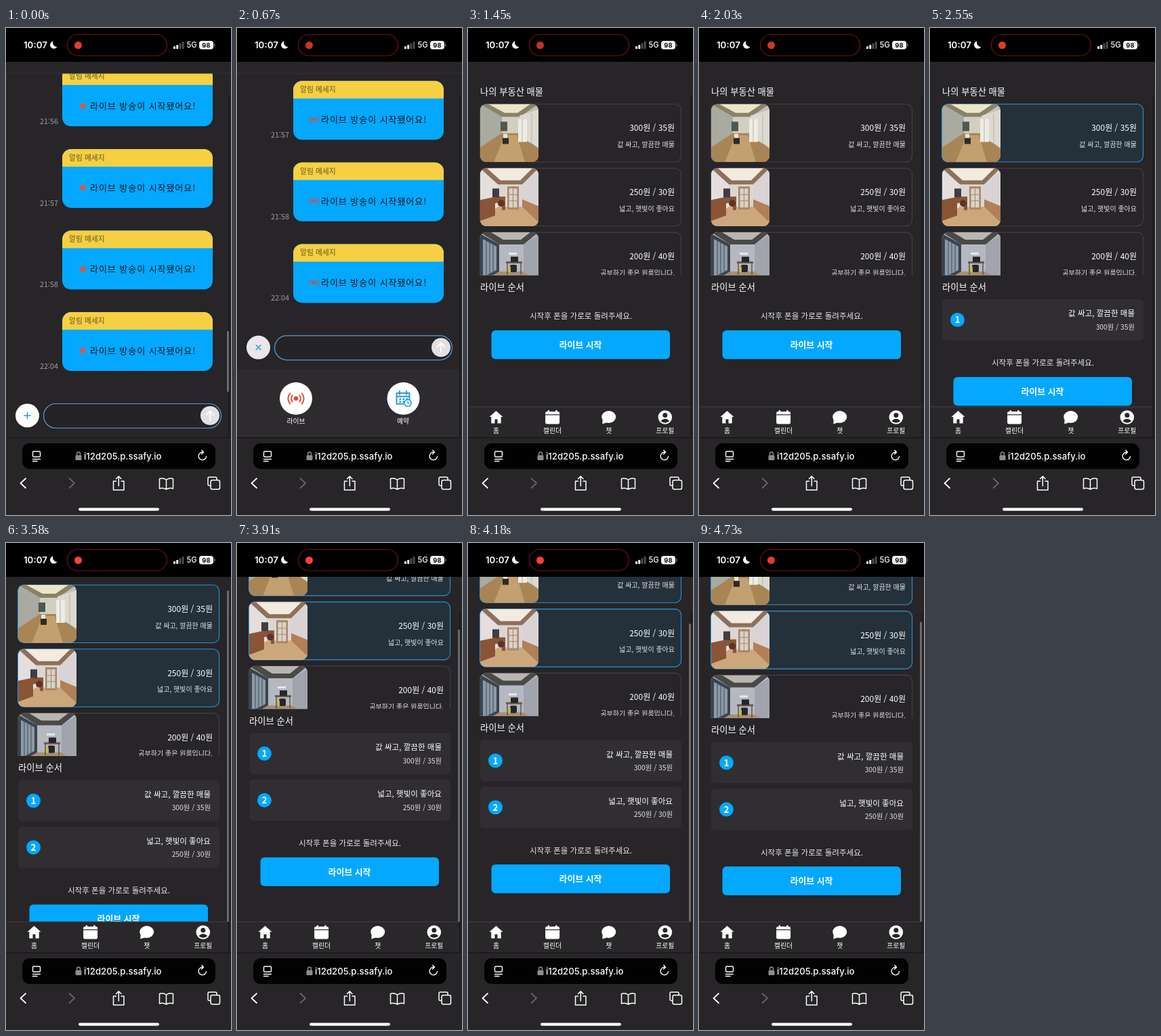
Recreate the animation shown at these times as an HTML page. Size 332 px wide and 720 px high, loop 4760 ms.

```html
<!DOCTYPE html>
<html lang="ko">
<head>
<meta charset="utf-8">
<style>
html, body { margin: 0; width: 100%; height: 100%; overflow: hidden; background: #000; }
svg { display: block; width: 332px; height: 720px; }
text { font-family: "Noto Sans CJK KR", "Noto Sans CJK", sans-serif; white-space: pre; }
.ui { font-family: Inter, sans-serif; }
.chat { letter-spacing: .95px; }
.line { fill: none; stroke-linecap: round; stroke-linejoin: round; }
</style>
</head>
<body>
<svg id="stage" viewBox="0 0 332 720"></svg>
<script>
const LOOP = 4760, BG = '#272528', BLUE = '#04a8ff', RED = '#e8452f';
const stage = document.getElementById('stage');

// Shape helpers; text is placed by its vertical middle.
const rect = (x, y, w, h, fill, r = 0, more = '') =>
  `<rect x="${x}" y="${y}" width="${w}" height="${h}" rx="${r}" fill="${fill}" ${more}/>`;
const circle = (x, y, r, fill, more = '') => `<circle cx="${x}" cy="${y}" r="${r}" fill="${fill}" ${more}/>`;
const line = (d, color, w = 1.6, more = '') => `<path class="line" d="${d}" stroke="${color}" stroke-width="${w}" ${more}/>`;
const shape = (d, fill) => `<path d="${d}" fill="${fill}"/>`;
const text = (x, y, size, str, { w = 400, fill = '#fff', at = 'start', cls = '' } = {}) =>
  `<text class="${cls}" x="${x}" y="${y + size * .37}" font-size="${size}" font-weight="${w}" fill="${fill}" text-anchor="${at}">${str}</text>`;
const group = (x, y, body, more = '') => `<g transform="translate(${x} ${y})" ${more}>${body}</g>`;
const clip = (id, x, y, w, h, r = 0) => `<clipPath id="${id}">${rect(x, y, w, h, '#000', r)}</clipPath>`;

const waves = (s, w) => [-1, 1].map(k =>
  line(`M${k * 4.3 * s} ${-4 * s}q${k * 3 * s} ${4 * s} 0 ${8 * s}M${k * 7.2 * s} ${-6.5 * s}q${k * 5 * s} ${6.5 * s} 0 ${13 * s}`, RED, w)).join('');

function bubble(y, time) {
  return group(0, y,
    text(77, 80, 10.8, time, { fill: '#a09ea1', at: 'end' }) +
    rect(83, 0, 222, 87, BLUE, 13) +
    shape('M83 26V13a13 13 0 0 1 13-13H292a13 13 0 0 1 13 13V26z', '#f6d042') +
    text(93, 13, 10.8, '알림 메세지', { fill: '#63562a' }) +
    circle(113.5, 57, 4, '#ee5135', 'class="dot"') +
    group(113.5, 57, circle(0, 0, 2.2, RED) + waves(.72, 1), 'class="rings"') +
    text(124, 57, 13, '라이브 방송이 시작됐어요!', { fill: '#08131c', cls: 'chat' }));
}

const rooms = [
  rect(0, 0, 86, 86, '#c3c0b4') +
  shape('M0 0H86L58 19H32z', '#8a8268') + shape('M12 0H74L55 13H36z', '#ece5c8') +
  shape('M0 0L32 19V44L0 66z', '#a9aaa0') + rect(32, 19, 26, 26, '#d2cfc2') +
  shape('M0 64L32 43H58L86 66V86H0z', '#a98455') + shape('M20 86L36 46H54L66 86z', '#c3a070') +
  shape('M58 17L86 8V64L58 48z', '#dcdad0') + rect(56, 22, 13, 34, '#eeece4') +
  line('M62 22V56M76 14V58', '#b5b3a9', 1) +
  rect(30, 26, 10, 14, '#4f5752') + rect(33, 50, 9, 9, '#2e2a26') + rect(34, 44, 6, 6, '#e5e3d9'),
  rect(0, 0, 86, 86, '#dcd6d3') +
  shape('M0 0H86L62 24H26z', '#8d705c') + shape('M10 0H77L59 18H30z', '#f3eae0') +
  shape('M0 2L26 24V58L0 70z', '#e4dedd') + shape('M62 24L86 4V78L62 58z', '#d9d3d5') +
  shape('M62 46L86 56V82L62 60z', '#b17f58') + shape('M0 76L26 57H62L86 80V86H0z', '#cda77c') +
  rect(40, 27, 17, 34, '#a7866b') + rect(42.5, 30, 12, 28, '#d9d2c6') +
  line('M48.5 30V58M43 39H54M43 48H54', '#a7866b', 1) +
  shape('M0 47L24 42H37V62H32V50L22 52V70L0 78z', '#8a5537') + rect(18, 30, 10, 13, '#423c43') +
  circle(31, 52, 5, '#5a3428'),
  rect(0, 0, 86, 86, '#b5b8c0') +
  shape('M0 0H86L64 18H28z', '#4b4948') + shape('M16 0H74L60 11H34z', '#b9b5b0') +
  shape('M0 2L28 18V60L0 74z', '#3b444e') + shape('M4 10L24 21V56L4 66z', '#8c9aa8') +
  line('M9 12V64M14 15V62M19 18V59', '#4d5966', 1.2) +
  shape('M64 18L86 4V76L64 58z', '#a1a4ac') + shape('M0 74L28 58H64L86 74V86H0z', '#a88f72') +
  rect(42, 30, 12, 3, '#e9eaee') + rect(38, 43, 24, 3, '#6f5844') + rect(45, 36, 11, 8, '#23262b') +
  rect(44, 48, 10, 11, '#26262a', 2) + rect(41, 51, 4, 8, '#c6b93c') + line('M60 46V62M40 46V62', '#45403c', 1.2)
];
const homes = [['300원 / 35원', '값 싸고, 깔끔한 매물'], ['250원 / 30원', '넓고, 햇빛이 좋아요'], ['200원 / 40원', '공부하기 좋은 원룸입니다.']];

const card = ([price, note], i) => group(17, 112 + 94.8 * i,
  rect(.5, .5, 297, 85.5, 'none', 9, 'class="card" stroke-width="1.1"') +
  `<g transform="translate(1 .5)" clip-path="url(#photo)">${rooms[i]}</g>` +
  text(288, 36, 12, price, { w: 500, at: 'end' }) + text(288, 60.5, 10, note, { fill: '#e4e3e5', at: 'end' }));

const order = ([price, note], i) => group(18, 401 + 69 * i,
  rect(0, 0, 297, 61, '#302e31', 6) + circle(22.5, 30.5, 10.5, BLUE) +
  text(22.5, 30.5, 13.5, i + 1, { w: 700, at: 'middle' }) +
  text(284, 21, 11.55, note, { w: 500, at: 'end' }) + text(284, 41, 10.3, price, { fill: '#e4e3e5', at: 'end' }),
  'class="order"');

const chatPage =
  `<g clip-path="url(#messages)"><g id="thread">` +
  ['21:56', '21:57', '21:58', '22:04'].map((time, i) => bubble(58.3 + 120.6 * i, time)).join('') + '</g></g>' +
  rect(0, 66.5, 332, 1, '#39373a') +
  `<g id="bar">` +
  rect(0, 606, 332, 102, '#2d2b2e') +
  circle(31.5, 573, 17.5, '#fff', 'id="plus"') +
  `<g id="cross">${line('M-4.6 0H4.6M0-4.6V4.6', '#1d9fe3', 1.6)}</g>` +
  rect(55.5, 555.5, 262, 36, '#252326', 18, 'stroke="#5b9bd8" stroke-width="1.2"') +
  circle(301, 573, 14, '#e2e0e3') + line('M301 580V566.5M295.5 572L301 566.5L306.500 572', '#fff', 1.8) +
  group(87, 648.5, circle(0, 0, 24, '#fff') + circle(0, 0, 3.2, RED) + waves(1.2, 1.8)) +
  group(245.5, 648.5, circle(0, 0, 24, '#fff') +
    line('M-10-8H9V3M-10-8V8H0M-10-3H9M-5.500-11V-6M4.500-11V-6', '#2596d6', 1.9) +
    [-6, -1, 4].map(x => rect(x, -.5, 2.6, 2.6, '#2596d6') + (x < 4 ? rect(x, 3.5, 2.6, 2.6, '#2596d6') : '')).join('') +
    circle(6.5, 6.5, 5, '#fff', 'stroke="#2596d6" stroke-width="1.6"') + line('M6.500 3.800V6.800H9', '#2596d6', 1.3)) +
  text(87, 681.8, 9.8, '라이브', { at: 'middle' }) + text(245, 681.8, 9.8, '예약', { at: 'middle' }) +
  '</g>';

const navIcons = [
  shape('M0-9.500L10-.5H7.200V9H2V3H-2V9H-7.200V-.5H-10z', '#fff'),
  rect(-10.5, -8.5, 21, 18.5, '#fff', 2.5) + rect(-7, -10.5, 2.5, 4, '#fff', 1) + rect(4.500, -10.5, 2.5, 4, '#fff', 1) + rect(-10.5, -4.3, 21, 1.2, BG),
  `<ellipse cy="-.5" rx="10.500" ry="9" fill="#fff"/>` + shape('M-9 3L-9.500 10L-2 7.500z', '#fff'),
  circle(0, 0, 10.3, '#fff') + circle(0, -3, 3.5, BG) + shape('M-6.500 5.500Q0-1 6.500 5.500Q0 11 -6.500 5.500z', BG)
];

const livePage =
  `<g clip-path="url(#view)"><g id="scroll">` +
  text(18, 94, 13.3, '나의 부동산 매물', { w: 500 }) +
  `<g clip-path="url(#list)">${homes.map(card).join('')}</g>` +
  text(18, 383, 13.3, '라이브 순서', { w: 500 }) +
  homes.slice(0, 2).map(order).join('') +
  `<g id="start">${text(166.5, 426, 11.55, '시작후 폰을 가로로 돌려주세요.', { fill: '#e8e7e9', at: 'middle' })}` +
  rect(34.5, 447, 263.5, 42.5, BLUE, 6) + text(166, 468, 12.9, '라이브 시작', { w: 700, at: 'middle' }) + '</g></g></g>' +
  rect(0, 560, 332, 46, '#29272a') + rect(0, 559.5, 332, 1, '#454346') +
  ['홈', '캘린더', '챗', '프로필'].map((label, i) => {
    const x = 41.5 + 83.1 * i;
    return group(x, 575.5, navIcons[i]) + text(x, 595.8, 9.8, label, { at: 'middle' });
  }).join('');

const statusBar =
  rect(0, 0, 332, 50, '#000') +
  text(26, 25, 13.3, '10:07', { w: 600, cls: 'ui' }) +
  shape('M69.500 19.500A5.600 5.600 0 1 0 75.500 27.800A6 6 0 0 1 69.500 19.500z', '#fff') +
  rect(90.5, 9.5, 147, 31.5, '#000', 15.75, 'stroke="#74130f" stroke-width="1.2"') +
  circle(106.5, 25.5, 5.5, '#ff4330', 'id="rec"') +
  [4, 6, 8.5, 11].map((h, i) => rect(247 + 4.2 * i, 31 - h, 3, h, i < 2 ? '#fff' : '#4d4d4f', 1)).join('') +
  text(266.5, 25.3, 11.3, '5G', { w: 500, cls: 'ui' }) +
  rect(285, 19, 21, 12.5, '#f4f4f4', 4) + rect(307, 23, 1.500, 4.500, '#77777a', .7) +
  text(295.4, 25.3, 9.3, '98', { w: 700, fill: '#111', at: 'middle', cls: 'ui' });

const browserBar =
  rect(0, 606, 332, 114, '#272528') + rect(0, 605, 332, 1.5, '#1a181b') +
  rect(24, 614, 285, 38, '#020202', 11) +
  rect(39.5, 626, 11, 8, 'none', 1.5, 'stroke="#fff" stroke-width="1.4"') + line('M39.500 637.500H50.500M39.500 640.500H46', '#fff', 1.4) +
  rect(102.5, 631.5, 9, 7.5, '#8d8b8f', 1.5) + line('M104.500 632V629.500a2.500 2.500 0 0 1 5 0V632', '#8d8b8f', 1.4) +
  text(115, 633.3, 13.2, 'i12d205.p.ssafy.io', { w: 500, cls: 'ui' }) +
  line('M295.500 633.500A5.700 5.700 0 1 1 290.500 627.300M288.800 624.300L291.500 627.300L288.500 630', '#fff', 1.4) +
  line('M29 666L21.500 673L29 680', '#fff', 1.8) + line('M93.500 666L101 673L93.500 680', '#66646a', 1.8) +
  line('M162.500 670H158.500V683H174V670H170M166.300 677V663M162.500 666.500L166.300 662.700L170 666.500', '#fff', 1.5) +
  line('M236.500 668Q231.500 664.500 226.500 666.500V681Q231.500 679 236.500 682Q241.500 679 246.500 681V666.500Q241.500 664.500 236.500 668V682', '#fff', 1.5) +
  line('M301.500 676.500H300a2 2 0 0 1-2-2V666a2 2 0 0 1 2-2H309a2 2 0 0 1 2 2V668', '#fff', 1.5) +
  rect(302, 668.5, 13.5, 13.5, 'none', 2.5, 'stroke="#fff" stroke-width="1.5"') +
  rect(107, 709.5, 119, 4.2, '#fff', 2.1);

stage.innerHTML =
  '<defs>' + clip('messages', 0, 67, 332, 539) + clip('view', 0, 50, 332, 510) +
  clip('list', 0, 100, 332, 265.5) + clip('photo', 0, 0, 86, 85.5, 9) + '</defs>' +
  rect(0, 0, 332, 720, BG) +
  `<g id="chat">${chatPage}</g><g id="live">${livePage}</g>` +
  rect(328, 100, 2.5, 505, '#1d1b1e') + rect(326, 448, 3, 90, '#6d6b6e', 1.5, 'id="thumb"') +
  browserBar + statusBar;

const $ = id => document.getElementById(id);
const all = name => [...stage.querySelectorAll('.' + name)];
const [cards, orders, dots, rings] = ['card', 'order', 'dot', 'rings'].map(all);
const show = (el, on) => el.setAttribute('display', on ? 'inline' : 'none');
const move = (el, x, y, more = '') => el.setAttribute('transform', `translate(${x} ${y})${more}`);
const clamp = v => Math.min(1, Math.max(0, v));
const ease = (t, from, to) => { const p = clamp((t - from) / (to - from)); return p * p * (3 - 2 * p); };

const PAGE_AT = 1350, PICKS = [2420, 2900];
const SCROLL = [[3515, 0], [3580, 50], [3700, 113], [3790, 124], [3910, 120.2], [4080, 111.5], [4350, 106.7]];

function scrollAt(t) {
  const i = SCROLL.findIndex(([at]) => at > t);
  if (i < 0) return SCROLL.at(-1)[1];
  if (!i) return 0;
  const [[t0, a], [t1, b]] = [SCROLL[i - 1], SCROLL[i]];
  return a + (b - a) * (t - t0) / (t1 - t0);
}

function draw(t) {
  const onChat = t < PAGE_AT, thumb = $('thumb');
  show($('chat'), onChat);
  show($('live'), !onChat);
  $('rec').setAttribute('opacity', .88 + .12 * Math.cos((t - 3650) / LOOP * 2 * Math.PI));

  if (onChat) {
    const open = ease(t, 380, 590), up = -100.7 * open;
    move($('thread'), 0, up);
    move($('bar'), 0, up);
    move($('cross'), 31.5, 573, ` rotate(${45 * open})`);
    $('plus').setAttribute('fill', open > .1 && t < 1000 ? '#e9e7ea' : '#fff');
    dots.forEach(el => show(el, open < .5));
    rings.forEach(el => show(el, open >= .5));
    thumb.setAttribute('y', 448);
    thumb.setAttribute('height', 90);
    thumb.setAttribute('opacity', 1 - ease(t, 150, 450));
  } else {
    const s = scrollAt(t), top = Math.max(52, 28 + .83 * s);
    let count = 0;
    cards.forEach((el, i) => {
      const on = t >= PICKS[i];
      el.setAttribute('fill', on ? '#24313b' : 'none');
      el.setAttribute('stroke', on ? '#2a93d5' : '#434144');
      if (on) count++;
    });
    orders.forEach((el, i) => show(el, i < count));
    move($('start'), 0, 69 * count);
    move($('scroll'), 0, -s);
    thumb.setAttribute('y', top);
    thumb.setAttribute('height', 560 - top);
    thumb.setAttribute('opacity', s ? 1 : 0);
  }
}

const begin = performance.now();
(function tick() {
  draw((performance.now() - begin) % LOOP);
  requestAnimationFrame(tick);
})();
</script>
</body>
</html>
```
